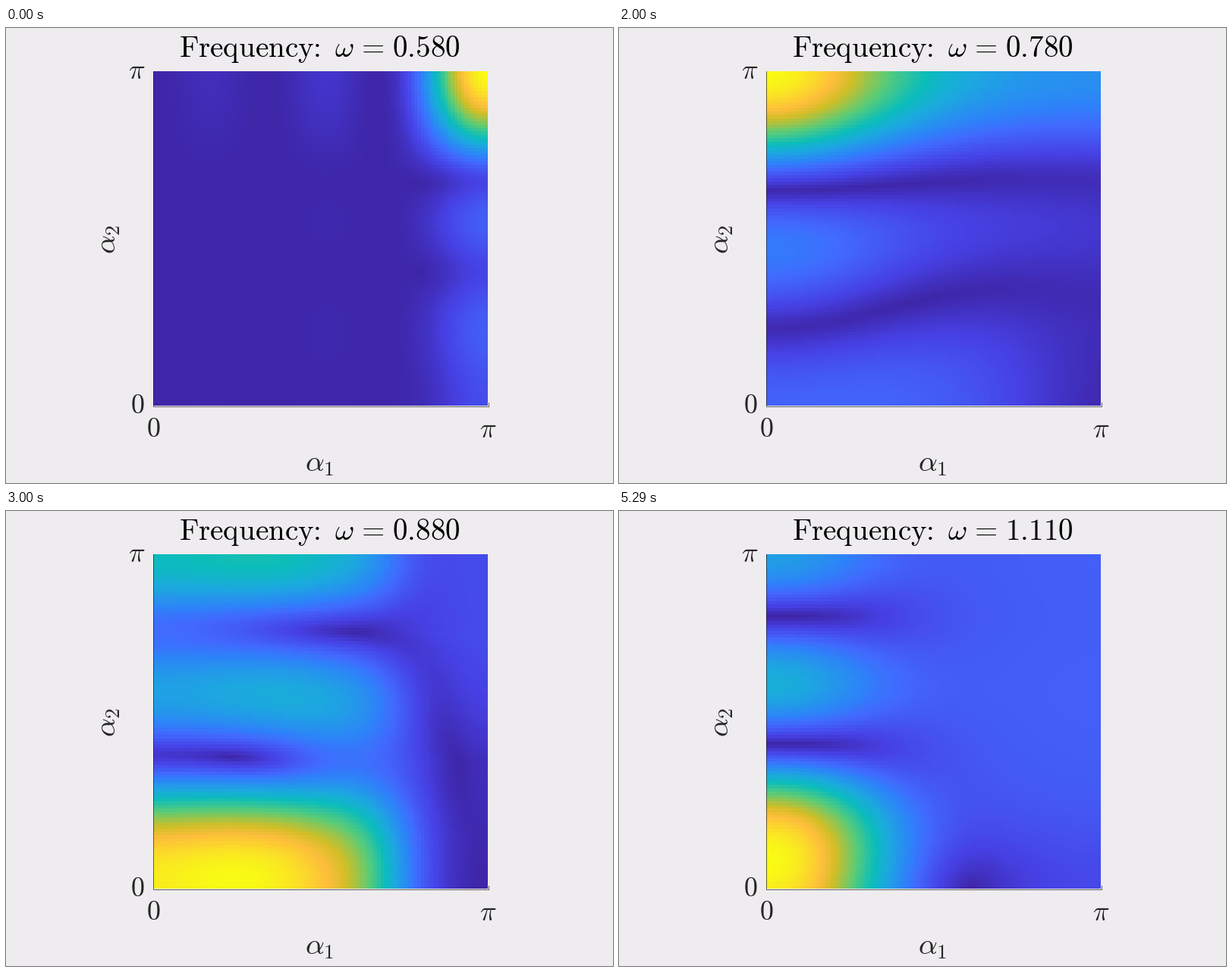
A matplotlib script that plays this animation: 800 by 600 pixels, repeating every 5.43 s.

```python
import numpy as np
import matplotlib.pyplot as plt
from matplotlib.animation import FuncAnimation
from matplotlib.colors import LinearSegmentedColormap

plt.rcParams["mathtext.fontset"] = "cm"

W, H, DPI = 800, 600, 100
LOOP, TICK, STEPS = 5430, 30, 38
LEFT, RIGHT, TOP, BOTTOM = 194, 635, 57, 498
N = 100
PI = np.pi
INK = "#262626"

CMAP = LinearSegmentedColormap.from_list("blue_yellow", [
    (0, "#3e26a8"), (.095, "#4741e5"), (.206, "#4269fe"), (.27, "#2f81fa"),
    (.397, "#1ca9df"), (.492, "#0bbdbc"), (.619, "#57cc7a"),
    (.762, "#d1bf27"), (.841, "#febe3c"), (1, "#f9fb15")])

# u runs left to right, down from the top edge, up from the bottom edge
cells = (np.arange(N) + 0.5) / N
u, down = np.meshgrid(cells, cells)
up = 1 - down
cu = np.cos(PI * u)


def lobes(v, z1, z2, e, power=1.0):
    """Array factor that is 1 at v=0 and crosses zero at z1 and z2."""
    c = np.cos(PI * v)
    c1, c2 = np.cos(PI * z1), np.cos(PI * z2)
    tail = 1 + e * ((1 - c) / 2) ** power
    return (c - c1) * (c - c2) / ((1 - c1) * (1 - c2)) * tail


def bell(k, power=1.0, floor=0.0):
    return floor + (1 - floor) * np.exp(-k * ((1 - cu) / 2) ** power)


def tilt(gain, start, slope):
    """Imaginary part that vanishes along a slanted line."""
    return 1j * gain * (cu - np.cos(PI * (start + slope * down)))


def corner():
    a = PI * (1 - u)
    x = (np.cos(a / 2) * (4 * np.cos(a) ** 2 - 1) / 3) ** 2
    return x * lobes(down, .335, .6, -.95) + .13j * (x - .2) * np.sqrt(x)


def band():
    x = .965 - .035 * cu - .02 * np.sin(PI * u)
    return x * lobes(down, .34, .676, -.95) + tilt(.07, .53, .2)


def upper_left():
    y = lobes(down, .358, .72, -.68 - .3 * u)
    return bell(2.25, floor=.2) * y + tilt(.09, .27, .36)


def upper_wave():
    bend = np.sin(PI * u / 1.46) ** 2
    y = lobes(down, .358 - .033 * bend, .77 - .12 * bend, -.48 - .5 * u ** 2)
    return bell(2.4, floor=.25) * y + tilt(.02, .3, .25)


def lower_wide():
    rise = .77 + .25 * np.sin(PI * np.minimum(u, .45) / .9) ** 2
    x = rise / (1 + np.exp((u - .72) / .07))
    ridge = .34 * np.sin(PI * u ** 1.29) ** 2 - .09
    slope = .24 * cu + .03
    g = (ridge * np.sin(PI * np.minimum(up / .77, 1))
         + slope * np.clip(up / .38 - 1, 0, 1))
    return x * lobes(up, .385, .765, .75, .7) + 1j * g


def lower_left(power, z1, z2, e, level):
    x = bell(2.75, power)
    phase = PI / 2 * (1 + down ** 4)
    return (x * lobes(up, z1, z2, e, .7)
            + level * (1 - x) * np.exp(1j * phase))


KEYS = [
    (.58, corner()), (.61, band()), (.70, upper_left()), (.78, upper_wave()),
    (.84, lower_wide()), (.97, lower_left(1.3, .42, .81, .85, .13)),
    (1.11, lower_left(1.1, .433, .814, 1.75, .2)),
]


def response(omega):
    """Normalised amplitude, blended between the two nearest key fields."""
    for (w0, f0), (w1, f1) in zip(KEYS, KEYS[1:]):
        if omega <= w1:
            break
    p = (omega - w0) / (w1 - w0)
    z = np.abs((1 - p) * f0 + p * f1)
    return (z - z.min()) / (z.max() - z.min())


def frequency(frame):
    # each step holds for about 143 ms, rounded to the tick it begins in
    step = int((frame * TICK + TICK - 2) * STEPS / LOOP)
    return .58 + .01 * np.ceil(step * 10 / 7)


def title_text(omega):
    return (r"$\mathrm{Frequency}\hspace{-0.2}\mathrm{:}\hspace{0.305}\omega"
            r"\hspace{0.116}=\hspace{0.116}\mathrm{%.3f}$" % omega)


fig = plt.figure(figsize=(W / DPI, H / DPI), dpi=DPI, facecolor="#eeecef")
ax = fig.add_axes([0, 0, 1, 1])
image = ax.imshow(response(.58), cmap=CMAP, vmin=0, vmax=1, aspect="auto",
                  interpolation="nearest", extent=(LEFT, RIGHT, BOTTOM, TOP))
ax.set_xlim(0, W)
ax.set_ylim(H, 0)
ax.axis("off")

ax.plot([LEFT - .5, LEFT - .5, RIGHT + .5, RIGHT + .5],
        [TOP, BOTTOM + .5, BOTTOM + .5, BOTTOM - 4], color=INK, lw=0.5)


def label(x, y, text, px, ha="center", color=INK, **kw):
    return ax.text(x, y, text, fontsize=px * 72 / DPI, ha=ha, va="baseline",
                   color=color, **kw)


title = label(413, 38.5, title_text(.58), 39, color="black")
label(183, 508, r"$\mathrm{0}$", 36, ha="right")
label(183, 66, r"$\pi$", 36, ha="right")
label(194, 539, r"$\mathrm{0}$", 36)
label(635, 539, r"$\pi$", 36)
label(413.5, 584, r"$\alpha_\mathrm{1}$", 39)
label(144.5, 278, r"$\alpha_\mathrm{2}$", 39, rotation=90, rotation_mode="anchor")


def update(frame):
    omega = frequency(frame)
    image.set_data(response(omega))
    title.set_text(title_text(omega))
    return image, title


anim = FuncAnimation(fig, update, frames=LOOP // TICK, interval=TICK,
                     repeat=True, repeat_delay=0, blit=False)
plt.show()
```
